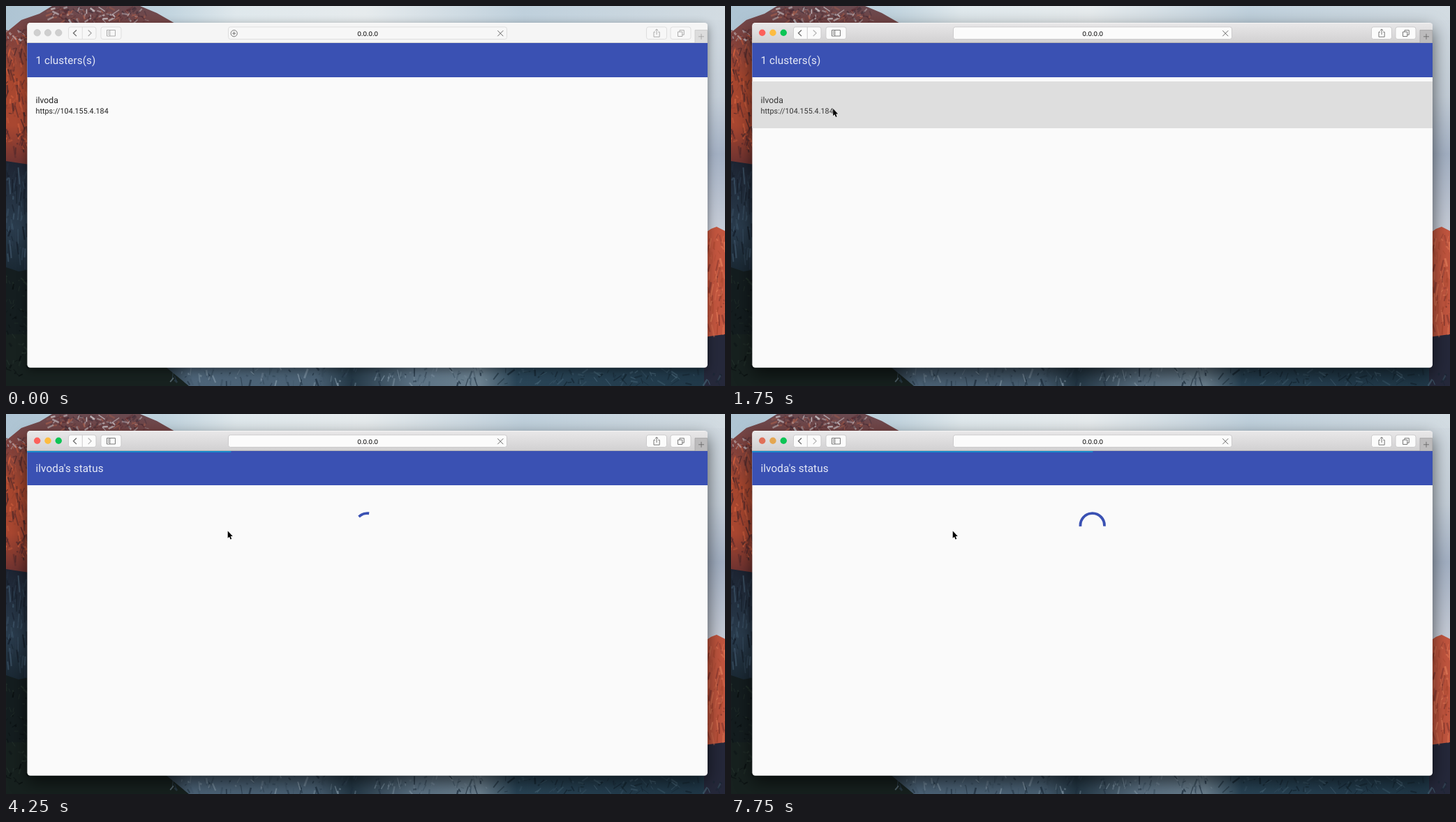
An HTML page for the animation above (8 s loop, 1030 px wide and 544 px high).

```html
<!DOCTYPE html>
<html lang="en">
<head>
<meta charset="utf-8">
<title>Cluster status</title>
<style>
  html, body { margin: 0; width: 100%; height: 100%; overflow: hidden; background: #222f3a; }
  svg { display: block; width: 1030px; height: 544px; }
  text { font-family: Roboto, sans-serif; text-rendering: geometricPrecision; fill: #212121; }
  .title { font-size: 15.3px; letter-spacing: .06px; fill: #e6e9f6; }
  .name { font-size: 12.25px; }
  .url { font-size: 10.8px; }
  .address { font: 500 9px Inter, sans-serif; fill: #222; text-anchor: middle; }
  .frame { filter: drop-shadow(0 9px 12px rgba(0, 0, 0, .62)); }
  .bar { fill: url(#chrome); }
  .edge { stroke: #b4b3b4; }
  .button { fill: #fbfbfb; stroke: #c9c8c9; }
  .icon { fill: none; stroke: #6a6a6a; }
  .faint { stroke: #b5b5b5; }
  .tab { fill: #bcbbbc; stroke: #a6a5a6; }
  .red { fill: #fc605b; }
  .amber { fill: #fdbc40; }
  .green { fill: #0cc555; }
  .dim .red { fill: #e06f58; }
  .dim .amber { fill: #e4a650; }
  .inactive .frame { filter: drop-shadow(0 4px 7px rgba(0, 0, 0, .45)); }
  .inactive .bar { fill: #f5f5f5; }
  .inactive .edge { stroke: #d5d5d5; }
  .inactive .button { fill: #f7f7f7; stroke: #dcdcdc; }
  .inactive .icon:not(.keep) { stroke: #a4a4a4; }
  .inactive .tab { fill: #dcdcdc; stroke: #c8c8c8; }
  .inactive .light { fill: #cfcfcf; stroke: #c2c2c2; }
  .hover { fill: #dedede; }
  .pressed text { fill: #363636; }
</style>
</head>
<body>
<svg id="stage" viewBox="0 0 1030 544">
  <defs>
    <linearGradient id="sky">
      <stop stop-color="#aec4d3"/><stop offset=".22" stop-color="#c0d3de"/>
      <stop offset=".32" stop-color="#dfe8ec"/><stop offset=".5" stop-color="#e6ebed"/>
      <stop offset=".72" stop-color="#bfd0dc"/><stop offset="1" stop-color="#d3dce2"/>
    </linearGradient>
    <linearGradient id="chrome" x2="0" y2="1">
      <stop stop-color="#e9e8e9"/><stop offset="1" stop-color="#d1d0d1"/>
    </linearGradient>
    <linearGradient id="haze" x2="0" y2="1">
      <stop stop-color="#d0d9e0"/><stop offset=".35" stop-color="#c3cdd7"/>
      <stop offset=".62" stop-color="#a3b0c3"/><stop offset="1" stop-color="#c9ced8"/>
    </linearGradient>
    <linearGradient id="cliff" x2="0" y2="1">
      <stop stop-color="#694a50"/><stop offset=".2" stop-color="#80433f"/>
      <stop offset=".45" stop-color="#a8472f"/><stop offset=".75" stop-color="#a94731"/>
      <stop offset="1" stop-color="#6b3231"/>
    </linearGradient>
    <linearGradient id="shade" x2="0" y2="1">
      <stop stop-color="#1d2432"/><stop offset=".6" stop-color="#2a3c4d"/>
      <stop offset="1" stop-color="#1a2833"/>
    </linearGradient>
    <linearGradient id="valley">
      <stop stop-color="#1a2327"/><stop offset=".21" stop-color="#1f2c35"/>
      <stop offset=".26" stop-color="#4d6478"/><stop offset=".43" stop-color="#4a6174"/>
      <stop offset=".48" stop-color="#243846"/><stop offset=".57" stop-color="#5c7284"/>
      <stop offset=".66" stop-color="#6a7f8e"/><stop offset=".71" stop-color="#294456"/>
      <stop offset="1" stop-color="#1f3747"/>
    </linearGradient>
  </defs>

  <g id="scene">
    <path fill="url(#sky)" d="M0 0H1030V60H0Z"/>
    <path fill="url(#haze)" d="M1000 20H1030V330H1000Z"/>
    <path fill="url(#cliff)" d="M0 38L22 20 48 11 66 0H192L216 10 244 26V60H40V228H0Z"/>
    <path fill="url(#shade)" d="M0 222L40 228V380H0Z"/>
    <path fill="#141d1f" d="M0 374L18 380 40 376V544H0Z"/>
    <path fill="url(#valley)" d="M0 510H1030V544H0Z"/>
    <path fill="#17211f" d="M0 470H40V512L228 516 262 544H0Z"/>
    <path fill="#c2563f" d="M1000 326L1010 319 1018 316 1030 322V476H1000Z"/>
    <path fill="#25283a" d="M1000 474L1030 470V544H1000Z"/>
    <g id="grain" fill="none"></g>
  </g>

  <g class="frame">
    <rect x="30.4" y="24" width="974.6" height="493.7" rx="4.5" fill="#fafafa"/>
    <path class="bar" d="M30.4 53V28.5a4.5 4.5 0 0 1 4.5-4.5H1000.5a4.5 4.5 0 0 1 4.5 4.5V53Z"/>
  </g>
  <path class="edge" d="M30.4 52.5H1005"/>
  <path d="M34 24.5H1001" stroke="#fff" opacity=".55"/>

  <g stroke-width=".6">
    <circle class="light red" cx="44.7" cy="38.3" r="4.7"/>
    <circle class="light amber" cx="60" cy="38.3" r="4.7"/>
    <circle class="light green" cx="75.3" cy="38.3" r="4.7"/>
  </g>
  <g class="button" stroke-width=".9">
    <rect x="89.5" y="30" width="39.5" height="17.5" rx="3"/>
    <path d="M109.3 30V47.5"/>
    <rect x="136" y="30" width="29" height="17.5" rx="3"/>
    <rect x="318.5" y="30" width="399" height="17.5" rx="3"/>
    <rect x="917.5" y="30" width="29" height="17.5" rx="3"/>
    <rect x="952" y="30" width="29" height="17.5" rx="3"/>
  </g>
  <path class="tab" stroke-width=".8" d="M987 53V34.5H1004.6V53Z"/>
  <path class="icon keep" stroke-width="1.3" d="M101 34.5L96.5 38.8 101 43.1"/>
  <path class="icon faint" stroke-width="1.2" d="M117.7 34.5L122.2 38.8 117.7 43.1"/>
  <g class="icon" stroke-width=".9">
    <path d="M144.5 34.5H156.5V43H144.5ZM148.8 34.5V43M146 36.5H147.5M146 38.5H147.5M146 40.5H147.5"/>
    <path d="M930 37.2H928V44.2H936.2V37.2H934.2M932.1 41V33.2M929.9 35.3L932.1 33.1 934.3 35.3"/>
    <path d="M962.5 37H968.8V43.5H962.5ZM965 37V34.7H971.3V41.2H968.8"/>
    <path d="M992 43.8H1000M996 39.8V47.8"/>
  </g>
  <path class="icon keep" d="M704.3 35.2L712.3 43.2M712.3 35.2L704.3 43.2"/>
  <g id="plus" class="icon keep" stroke-width=".9">
    <circle cx="326.7" cy="39.2" r="4.6"/>
    <path d="M324.2 39.2H329.2M326.7 36.7V41.7"/>
  </g>
  <text class="address" x="518.2" y="42.6">0.0.0.0</text>

  <rect x="30.4" y="53" width="974.6" height="49" fill="#3a51b3"/>
  <rect id="load" x="30.4" y="53" height="2" fill="#1689cb"/>
  <text id="title" class="title" x="42.5" y="83.2"></text>

  <g id="list">
    <rect id="hover" class="hover" x="30.4" y="108" width="974.6" height="67"/>
    <text class="name" x="42.5" y="138.6">ilvoda</text>
    <text class="url" x="42.5" y="153.8">https://104.155.4.184</text>
  </g>
  <path id="spinner" fill="none" stroke="#3a51b3" stroke-width="3.83"/>
  <path id="cursor" d="M0 0V10.2L2.3 8.1 3.9 11.8 5.5 11.1 4 7.5H7.1Z" stroke="#fff" paint-order="stroke"/>
</svg>
<script>
  const $ = id => document.getElementById(id);
  const LOOP = 8000, STEP = 250;

  // Rows are [time, value, ...], joined by straight lines.
  const cursorPath = [[250, 345, 46], [500, 268, 68], [750, 208, 86], [1000, 177, 95],
    [1250, 138, 151], [1500, 138, 151], [2000, 155, 144], [2500, 190, 146], [3250, 318, 168]];
  const loadPath = [[2250, 30], [2500, 73], [3750, 265], [4250, 322], [6500, 453], [7750, 518]];
  // Sweep cycles and turn in degrees
  const spinPath = [[1800, 0, -28], [2000, .15, 19], [4250, 1.761, 548], [6500, 3.484, 1054], [7750, 4.418, 1345]];

  function along(rows, t) {
    if (t <= rows[0][0]) return rows[0].slice(1);
    const i = rows.findIndex(r => r[0] >= t);
    if (i < 0) return rows[rows.length - 1].slice(1);
    const a = rows[i - 1], b = rows[i], k = (t - a[0]) / (b[0] - a[0]);
    return a.slice(1).map((v, j) => v + (b[j + 1] - v) * k);
  }

  const smoother = x => x * x * x * (x * (6 * x - 15) + 10);

  function show(el, on) { el.style.display = on ? '' : 'none'; }

  function point(deg) {
    const a = deg * Math.PI / 180;
    return `${517.7 + 17.2 * Math.sin(a)} ${159.3 - 17.2 * Math.cos(a)}`;
  }

  // The head sweeps 270 degrees, then the tail catches up; each cycle starts 90 degrees back.
  function arc(t) {
    const [cycles, turn] = along(spinPath, t);
    const n = Math.floor(cycles);
    const v = .01 + 1.48 * smoother(cycles - n);
    const base = turn - 90 * n;
    const tail = Math.max(0, v - .75) * 360, head = Math.min(.75, v) * 360;
    return `M${point(base + tail)}A17.2 17.2 0 ${head - tail > 180 ? 1 : 0} 1 ${point(base + head)}`;
  }

  function draw(t) {
    const status = t >= 2000, pressed = t >= 1250 && !status;
    const stage = $('stage').classList;
    stage.toggle('inactive', t < 500);
    stage.toggle('dim', t < 1250 || t >= 7000);
    show($('plus'), t < 500);
    show($('list'), !status);
    show($('hover'), pressed);
    show($('spinner'), status);
    show($('cursor'), t >= 250);
    $('list').classList.toggle('pressed', pressed);
    $('title').textContent = status ? "ilvoda's status" : '1 clusters(s)';
    $('spinner').setAttribute('d', arc(t));
    $('load').setAttribute('width', along(loadPath, t)[0] - 30);
    const [x, y] = along(cursorPath, t);
    $('cursor').setAttribute('transform', `translate(${x - .3} ${y - .4})`);
  }

  let seed = 7;
  const rand = () => (seed = seed * 16807 % 2147483647) / 2147483647;

  // Short rock streaks inside a box
  function streaks(count, x, y, w, h, colors, dx, dy) {
    let out = '';
    for (let i = 0; i < count; i++) {
      const color = colors[i % colors.length];
      out += `<path stroke="${color}" stroke-width="${.8 + 2 * rand()}" opacity="${.3 + .5 * rand()}"
        d="M${x + w * rand()} ${y + h * rand()}l${dx * (rand() - .5)} ${dy * rand()}"/>`;
    }
    return out;
  }

  $('grain').innerHTML =
    streaks(130, 0, 40, 30, 165, ['#d4623f', '#552a2c', '#8f3d2e', '#3f2428'], 12, 18) +
    streaks(150, 66, 1, 136, 19, ['#5a2d32', '#a8604f', '#d3d0d4', '#45303a'], 20, 7) +
    streaks(40, 2, 32, 34, 18, ['#5a3338', '#c3bcc2', '#8d5148'], 14, 6) +
    streaks(70, 0, 225, 30, 130, ['#41586c', '#111823', '#2b3b4c'], 6, 26) +
    streaks(60, 0, 380, 30, 150, ['#27352e', '#090e10'], 14, 8) +
    streaks(160, 235, 516, 455, 24, ['#8398a8', '#223444', '#3a5062'], 10, 14) +
    streaks(90, 700, 518, 325, 22, ['#142531', '#436072'], 22, 10) +
    streaks(80, 1004, 326, 26, 130, ['#e27a58', '#86382f', '#a9472f'], 8, 20);

  function tick(now) {
    draw(Math.floor(now % LOOP / STEP) * STEP);
    requestAnimationFrame(tick);
  }
  draw(0);
  requestAnimationFrame(tick);
</script>
</body>
</html>
```
